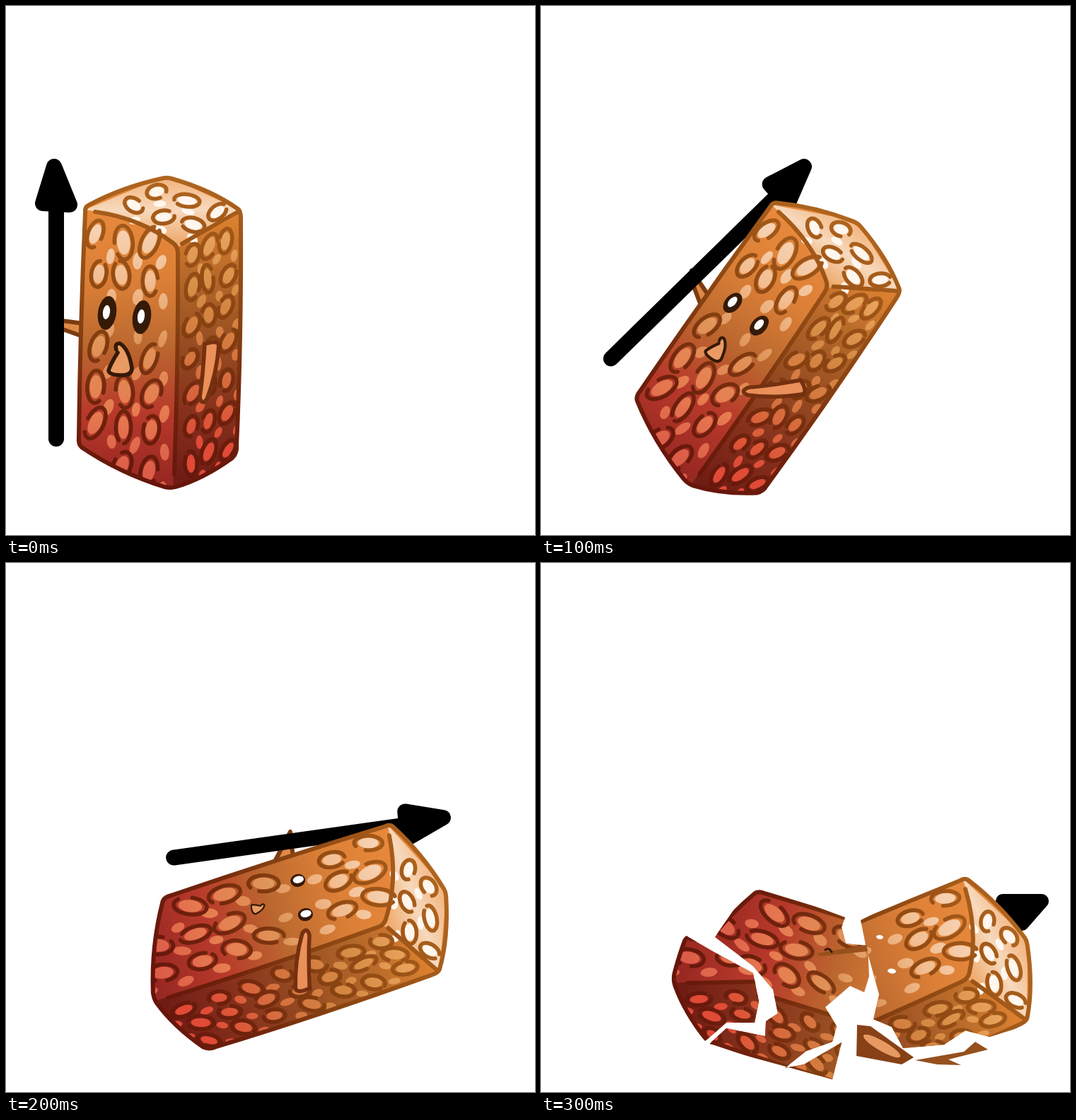
These frames come from a looping animation (748 by 748 pixels, 400 ms). An HTML page:

```html
<!DOCTYPE html>
<html lang="en">
<head>
<meta charset="utf-8">
<title>Spear thrower</title>
<style>
  html, body { margin: 0; width: 100%; height: 100%; overflow: hidden; background: #fff; }
  svg { display: block; width: 100vw; height: 100vh; }
</style>
</head>
<body>
<svg id="stage" viewBox="0 0 748 748" stroke-linecap="round" stroke-linejoin="round"></svg>
<script>
const STEP = 100, STEPS = 4;
const CORNER = [112, 288]; // upper left corner of the upright block
const DARK = '#351a07';

let seed = 11;
const random = (low, high) => {
  seed = (seed * 16807) % 2147483647;
  return low + (high - low) * seed / 2147483647;
};

// Vertical gradient with evenly spaced colours
const ramp = (id, top, bottom, ...colors) =>
  `<linearGradient id="${id}" gradientUnits="userSpaceOnUse" x1="0" x2="0" y1="${top}" y2="${bottom}">` +
  colors.map((color, i) => `<stop offset="${i / (colors.length - 1)}" stop-color="${color}"/>`).join('') +
  '</linearGradient>';

// Elliptical arc that leaves `gap` radians open; absolute points keep the gradients upright
function arc({ x, y, rx, ry, tilt }, scale, start = 0, gap = .01) {
  const a = tilt * Math.PI / 180, w = rx * scale, h = ry * scale;
  const at = t => {
    const u = w * Math.cos(t), v = h * Math.sin(t);
    return `${x + u * Math.cos(a) - v * Math.sin(a)} ${y + u * Math.sin(a) + v * Math.cos(a)}`;
  };
  return `M${at(start)}A${w} ${h} ${tilt} 1 1 ${at(start + 2 * Math.PI - gap)}`;
}

// A lattice of puffed grains, with small loose spots half a cell further on
function grains({ cols, rows, at, rx, ry, tilt, fill, skip = () => false }) {
  let fills = '', rings = '';
  for (let r = 0; r < rows; r++) for (let c = 0; c < cols; c++) {
    const place = (dc, dr, size) => {
      const [x, y] = at(c + dc, r + dr);
      return { x: x + random(-3, 3), y: y + random(-4, 4), tilt: random(...tilt),
        rx: size * random(...rx), ry: size * random(...ry) };
    };
    const grain = place(0, 0, 1), spot = place(.5, .5, .55);
    fills += arc(spot, 1) + 'Z';
    if (skip(c, r)) continue;
    fills += arc(grain, .72) + 'Z';
    rings += arc(grain, 1, random(0, 6.28), random(.5, 1.2));
  }
  return `<path d="${fills}" fill="${fill}"/>` +
    `<path d="${rings}" fill="none" stroke="url(#line)" stroke-width="5.5"/>`;
}

const topGrains = grains({
  cols: 3, rows: 2, at: (c, r) => [216 + 42 * c - 38 * r, 263 + 13 * c + 20 * r],
  rx: [14, 19], ry: [8, 10], tilt: [-40, 40], fill: '#fff6ee'
});
const frontGrains = grains({
  cols: 3, rows: 7, at: (c, r) => [129 + 37 * c, 326 + 53 * r + 5 * c],
  rx: [10, 13], ry: [18, 24], tilt: [-8, 26], fill: 'url(#pale)',
  skip: (c, r) => r === 2 || (r === 3 && c === 1) || (r === 6 && c === 0) // room for the face
});
const sideGrains = grains({
  cols: 3, rows: 7, at: (c, r) => [263 + 25 * c, 350 + 49 * r - 10 * c],
  rx: [8, 10], ry: [14, 20], tilt: [-5, 35], fill: 'url(#amber)'
});

const outline = 'M112 292Q111 284 118 281Q165 256 220 244Q227 242 234 244Q290 260 328 287Q332 290 332 300' +
  'Q333 470 326 622Q327 632 320 639Q280 668 240 680Q233 682 224 680Q160 660 107 624Q102 620 103 610Q105 450 112 292Z';

const defs = `<defs>
  ${ramp('front', 290, 670, '#e8893c', '#dc8037', '#bb682f', '#b8392b', '#982822')}
  ${ramp('side', 290, 670, '#e08330', '#b5682a', '#964c21', '#86301c', '#701c15')}
  ${ramp('top', 242, 335, '#f3b27a', '#f7d9bd', '#efaa6c')}
  ${ramp('line', 242, 680, '#b0661f', '#995116', '#843f10', '#6f220c', '#66150b')}
  ${ramp('pale', 300, 660, '#f7d6ba', '#f2bd90', '#df9458', '#e67c50', '#dc5c48')}
  ${ramp('amber', 310, 620, '#eba660', '#d48a43', '#d5703e', '#e04a36')}
  <clipPath id="body"><path d="${outline}"/></clipPath>
  <g id="block">
    <g clip-path="url(#body)">
      <path d="${outline}" fill="url(#front)"/>
      <path d="M243 340L340 286V700H236Z" fill="url(#side)"/>
      <path d="M112 288L226 240L334 290L243 341Q190 300 112 288Z" fill="url(#top)"/>
      ${topGrains}${frontGrains}${sideGrains}
    </g>
    <path d="${outline}M126 291Q190 300 236 335Q243 340 243 350Q244 500 238 662M249 336Q280 318 328 291"
      fill="none" stroke="url(#line)" stroke-width="6"/>
  </g>
  <g id="spear" stroke="#000" stroke-width="22">
    <path d="M71 285V612"/><path d="M68 227L52 279L90 281Z"/>
  </g>
</defs>`;

const block = '<use href="#block"/>';
const place = (inner, [x, y], angle, [px, py] = CORNER) =>
  `<g transform="translate(${x} ${y}) rotate(${angle}) translate(${-px} ${-py})">${inner}</g>`;
const poly = (points, fill) => `<polygon points="${points}" fill="${fill}"/>`;
const oval = (x, y, rx, ry, fill, tilt = 8) =>
  `<ellipse rx="${rx}" ry="${ry}" fill="${fill}" transform="translate(${x} ${y}) rotate(${tilt})"/>`;

// The face shrinks as the block falls; eyes flatten while their shine stays
const eye = (x, y, open) => oval(x, y, 6 + 7 * open, 24 * open, DARK) +
  oval(x - 1, y - 1, 5, 6 + 4 * open, '#fff');
const face = (open, mouth) => eye(143, 434, open) + eye(192, 440, open) +
  `<path transform="translate(160 500) scale(${mouth}) translate(-160 -500)"
    d="M156 486Q153 477 161 477Q174 485 178 512Q178 522 165 522Q145 522 145 515Q148 506 158 490"
    fill="#e99b63" stroke="${DARK}" stroke-width="5.5"/>`;
const nearArm = swing => `<path transform="rotate(${swing} 290 478)" fill="#ea905a" stroke="#75300f" stroke-width="5.5"
  d="M281 478Q278 530 274 552Q276 566 284 556Q298 520 301 479Q298 472 281 478"/>`;
const farArm = points =>
  `<polygon points="${points}" fill="#df8a48" stroke="#7a3c10" stroke-width="6"/>`;

const thrower = p => farArm(p.arm) +
  place('<use href="#spear"/>', p.tip, p.aim, [68, 227]) +
  place(block + face(p.open, p.mouth) + nearArm(p.swing), p.at, p.turn);

const poses = [
  { at: CORNER, turn: 0, tip: [68, 227], aim: 0, swing: 0, open: 1, mouth: 1,
    arm: '64,443 110,449 108,467 80,457' },
  { at: [326, 281], turn: 33.6, tip: [372, 227], aim: 45.6, swing: 43, open: .68, mouth: .75,
    arm: '213,374 238,411 227,426 215,394' },
  { at: [540, 371], turn: 70.5, tip: [618, 360], aim: 82, swing: 104, open: .44, mouth: .42,
    arm: '402,380 406,417 380,422' }
];

// A shard shows the block, moved and turned, through a broken outline
const shard = (id, area, ...placing) =>
  `<clipPath id="${id}"><polygon points="${area}"/></clipPath>` +
  `<g clip-path="url(#${id})">${place(block, ...placing)}</g>`;

const shattered =
  '<path d="M653 478H708L680 510Z" stroke="#000" stroke-width="20"/>' +
  shard('foot', '246,529 300,450 392,487 430,501 425,515 431,538 462,541 464,584 457,607 437,598 402,628 ' +
    '418,655 412,677 375,690 345,714 372,709 425,678 412,730 236,682 262,658 317,669 318,648 335,637 328,603 300,570',
    [309, 465], 106, [103, 618]) +
  shard('heel', '205,527 250,553 300,580 308,620 302,650 262,650 232,676 150,590',
    [188, 592], 87, [235, 681]) +
  shard('head', '452,505 600,430 710,500 700,650 634,670 600,661 570,681 512,686 496,656 470,645 478,610 460,545',
    [597, 447], 65.5) +
  oval(479, 529, 5, 3, '#fff') + oval(496, 577, 6, 3.5, '#fff') +
  poly('389,552 460,540 462,549 395,556', '#98501c') +
  `<path d="M402 547Q407 543 411 550" fill="none" stroke="${DARK}" stroke-width="3"/>` +
  poly('447,653 466,655 527,699 510,709 446,697', '#884116') +
  oval(482, 683, 30, 7, '#e69a61', 30) +
  poly('529,703 598,691 614,677 632,688 576,702 594,710 560,709', '#95501d');

const stage = document.getElementById('stage');
stage.innerHTML = defs + [...poses.map(thrower), shattered].map(scene => `<g class="scene">${scene}</g>`).join('');

stage.querySelectorAll('.scene').forEach((scene, i) => scene.animate([
  { opacity: 1, offset: 0, easing: 'step-end' },
  { opacity: 0, offset: 1 / STEPS, easing: 'step-end' },
  { opacity: 0, offset: 1 }
], { duration: STEP * STEPS, delay: (i - STEPS) * STEP, iterations: Infinity }));
</script>
</body>
</html>
```
